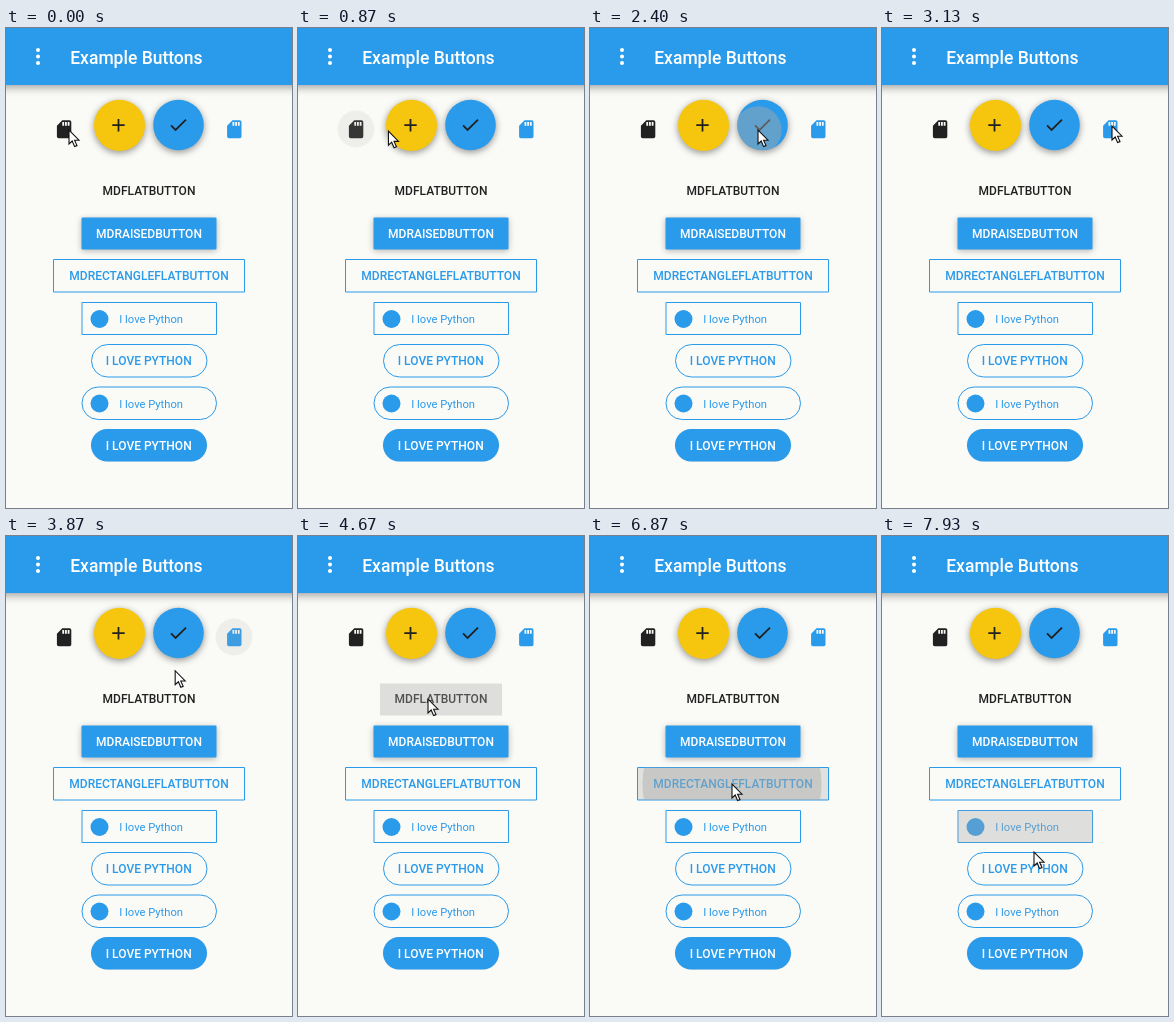
These frames come from a looping animation (286x480 px, 8 s). An HTML page with a canvas:

```html
<!DOCTYPE html>
<html lang="en">
<head>
<meta charset="utf-8">
<title>Example Buttons</title>
<style>
html, body { margin: 0; width: 100%; height: 100%; overflow: hidden; background: #fafaf7; }
canvas { display: block; width: 286px; height: 480px; }
</style>
</head>
<body>
<canvas></canvas>
<script>
const W = 286, H = 480, LOOP = 8000;
const BLUE = '#2a9aea', YELLOW = '#f6c60f', INK = '#212121', PAPER = '#fafaf7';
const canvas = document.querySelector('canvas');
const c = canvas.getContext('2d');
const dpr = window.devicePixelRatio || 1;
canvas.width = W * dpr;
canvas.height = H * dpr;
c.scale(dpr, dpr);

const disc = (x, y, r) => { const p = new Path2D(); p.arc(x, y, r, 0, 7); return p; };
const box = (x, y, w, h, r = 0) => { const p = new Path2D(); p.roundRect(x, y, w, h, r); return p; };

const shapes = {
  sdDark: disc(58, 101, 18.5),
  plus: disc(113.5, 97.3, 25.6),
  check: disc(172.5, 97, 25.3),
  sdBlue: disc(228, 101, 18.5),
  flat: box(82, 147.5, 122, 32),
  raised: box(75.5, 189.5, 135, 32, 1),
  rect: box(47.5, 231.5, 191, 32.5),
  iconRect: box(76, 274.5, 134.5, 32),
  round: box(85.5, 316.5, 115.5, 32.5, 16.2),
  iconRound: box(76, 359, 134.5, 32.5, 16.2),
  filled: box(85, 401, 116, 32.5, 16.2)
};

const sdCard = new Path2D('M18 2H10L4 8v12a2 2 0 0 0 2 2h12a2 2 0 0 0 2-2V4a2 2 0 0 0-2-2z' +
  'M12 8h-2V4h2zM15 8h-2V4h2zM18 8h-2V4h2z');
const arrow = new Path2D('M0 0V14L3.2 11L5.6 16.6L8 15.6L5.6 10.2H10z');

// Pointer stops: time, x, y
const stops = [
  [0, 63, 102], [680, 63, 102], [1000, 109, 104], [1700, 109, 104],
  [1930, 148, 102], [2070, 168, 102], [2560, 168, 102], [2800, 200, 99],
  [3070, 230, 98], [3600, 230, 98], [4050, 129, 159], [4270, 129, 159],
  [4400, 130, 163], [4690, 130, 163], [5000, 138, 201], [5450, 138, 201],
  [5710, 144, 261], [5790, 144, 261], [5980, 142, 248], [6990, 142, 248],
  [7300, 146, 291], [7600, 146, 291], [7730, 150, 304], [7910, 152, 316],
  [LOOP, 152, 316]
];

// Touch ripples: press time, growth time, final radius, fade start
const ripples = [
  { on: 'sdDark', press: 270, grow: 220, r: 26, fade: 540 },
  { on: 'plus', press: 1300, grow: 450, r: 35, fade: 1750 },
  { on: 'check', press: 2130, grow: 400, r: 35, fade: 2530 },
  { on: 'sdBlue', press: 3270, grow: 220, r: 26, fade: 3540 },
  { on: 'flat', press: 4270, grow: 240, r: 78, fade: 4560, tint: true },
  { on: 'raised', press: 5200, grow: 200, r: 76, fade: 5400 },
  { on: 'rect', press: 6250, grow: 680, r: 98, fade: 6960, tint: true },
  { on: 'iconRect', press: 7500, grow: 230, r: 74, fade: 7820, tint: true }
];
const FADE = 500, STRENGTH = 0.45;

function pointer(t) {
  const i = Math.max(1, stops.findIndex(s => s[0] >= t));
  const [t0, x0, y0] = stops[i - 1], [t1, x1, y1] = stops[i];
  const k = (t - t0) / (t1 - t0);
  return [x0 + (x1 - x0) * k, y0 + (y1 - y0) * k];
}

function fill(path, color) {
  c.fillStyle = color;
  c.fill(path);
}

function outline(path, color = BLUE, width = 1) {
  c.strokeStyle = color;
  c.lineWidth = width;
  c.stroke(path);
}

function raise(path, color, blur, dy, alpha) {
  c.save();
  c.shadowColor = `rgba(0,0,0,${alpha})`;
  c.shadowBlur = blur * dpr;
  c.shadowOffsetY = dy * dpr;
  fill(path, color);
  c.restore();
}

function text(s, x, y, color, font = '500 12px', align = 'center') {
  c.font = font + ' Roboto, sans-serif';
  c.textAlign = align;
  c.fillStyle = color;
  c.fillText(s, x, y);
}

function card(x, y, color) {
  c.save();
  c.translate(x, y);
  c.scale(0.9, 0.9);
  c.fillStyle = color;
  c.fill(sdCard, 'evenodd');
  c.restore();
}

function iconLabel(y) {
  fill(disc(93.5, y, 9), BLUE);
  text('I love Python', 113.3, y + 4.1, BLUE, '400 11.2px', 'left');
}

function tints(t) {
  for (const { on, press, grow, tint } of ripples) {
    if (tint && t > press && t < press + grow)
      fill(shapes[on], `rgba(0,0,0,${0.1 * Math.min(1, (t - press) / 500)})`);
  }
}

function scene(t) {
  fill(box(0, 0, W, H), PAPER);
  raise(box(-20, -20, W + 40, 77), BLUE, 9, 2, 0.4);
  for (const y of [22, 28.5, 35]) fill(disc(32, y, 2), '#fff');
  text('Example Buttons', 64.2, 36, '#fff', '500 17.5px', 'left');

  card(47.3, 90.5, INK);
  card(217.5, 90.5, BLUE);
  raise(shapes.plus, YELLOW, 7, 2, 0.42);
  raise(shapes.check, BLUE, 7, 2, 0.42);
  outline(new Path2D('M112.5 91v12.4M106.3 97.2h12.4'), INK, 1.8);
  outline(new Path2D('M165 97.3l4.6 4.6l10.4-10.2'), INK, 1.8);

  raise(shapes.raised, BLUE, 6, 1.5, 0.28);
  raise(shapes.filled, BLUE, 1, 0, 0.1);
  tints(t);
  for (const name of ['rect', 'iconRect', 'round', 'iconRound']) outline(shapes[name]);

  text('MDFLATBUTTON', 143, 167.3, INK);
  text('MDRAISEDBUTTON', 143, 209.6, '#fff');
  text('MDRECTANGLEFLATBUTTON', 143, 251.8, BLUE);
  iconLabel(291);
  text('I LOVE PYTHON', 142.7, 337, BLUE);
  iconLabel(375.5);
  text('I LOVE PYTHON', 142.7, 421.6, '#fff');
}

function drawRipples(t) {
  for (const { on, press, grow, r, fade } of ripples) {
    if (t < press || t > fade + FADE) continue;
    const size = r * Math.min(1, (t - press) / grow);
    const alpha = STRENGTH * Math.min(1, 1 - (t - fade) / FADE);
    c.save();
    c.clip(shapes[on]);
    fill(disc(...pointer(press), size), `rgba(168,168,168,${alpha})`);
    c.restore();
  }
}

function drawPointer(t) {
  c.save();
  c.translate(...pointer(t));
  fill(arrow, '#fff');
  outline(arrow, '#111', 1.1);
  c.restore();
}

function frame(now) {
  const t = now % LOOP;
  scene(t);
  drawRipples(t);
  drawPointer(t);
  requestAnimationFrame(frame);
}
requestAnimationFrame(frame);
</script>
</body>
</html>
```
